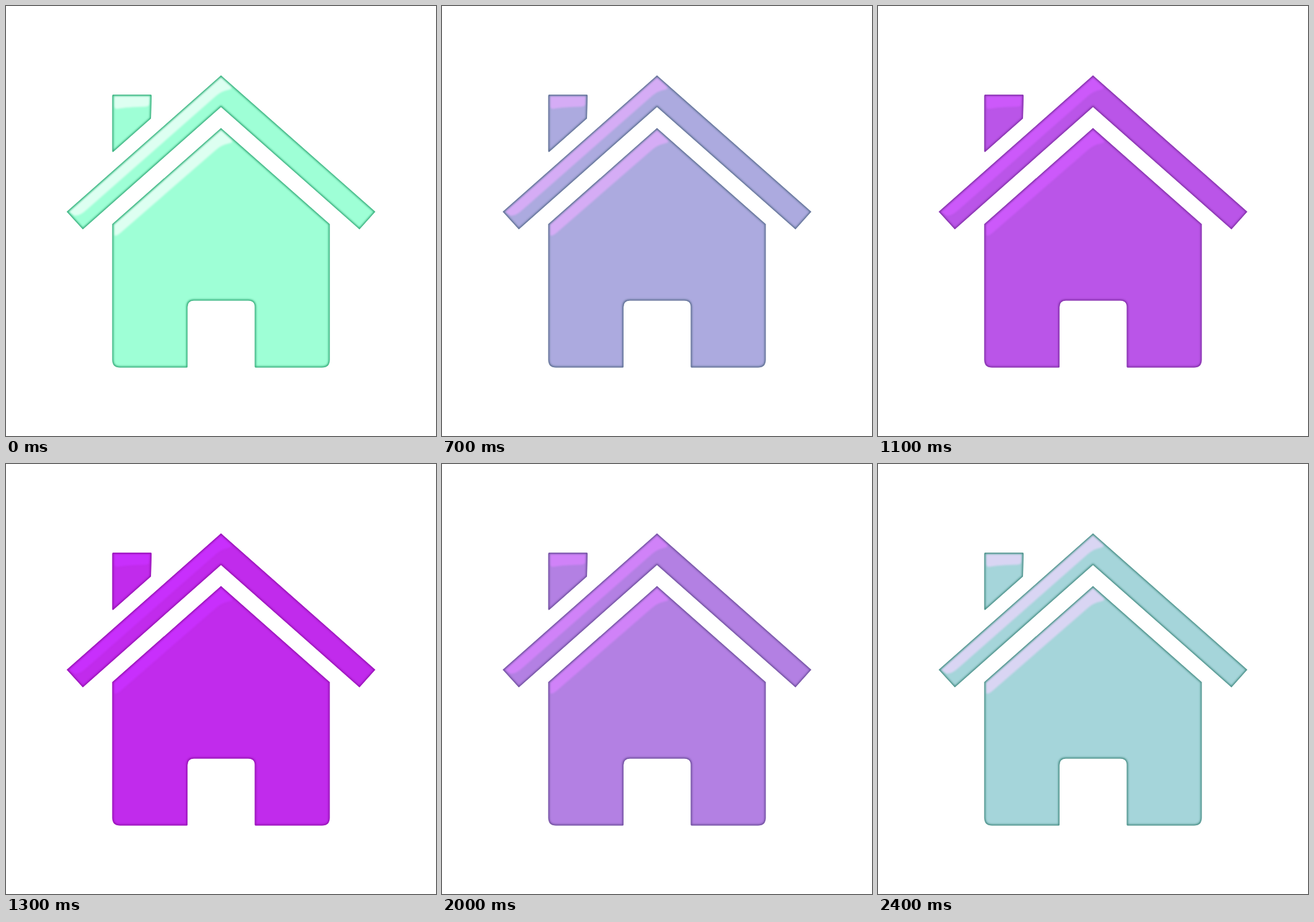
Animation, 694 px wide and 694 px high, one loop 2.6 s. Source, as an HTML page:

```html
<!DOCTYPE html>
<html lang="en">
<head>
<meta charset="utf-8">
<title>House</title>
<style>
html, body { margin: 0; width: 100%; height: 100%; overflow: hidden; background: #fff; }
svg { display: block; width: 100%; height: 100%; }
.base { fill: var(--base); }
.gloss { fill: var(--gloss); filter: blur(1.6px); }
.shade, .rim { fill: none; stroke: var(--edge); }
.shade { stroke-width: 4; filter: blur(1.8px); }
.rim { stroke-width: 2; opacity: .4; }
</style>
</head>
<body>
<svg viewBox="0 0 694 694">
  <defs>
    <path id="house" d="M173 143H233.500Q235 143 235 145L234 181.500L173 235.500Q171.500 236 171.500 234V145Q171.500 143 173 143Z
      M347 112L596 332L570.500 360.500L347 163L124 360.500L98 332Z
      M347 197L522.500 352V571Q522.500 583.500 510 583.500H403Q401.500 583.500 401.500 582V486Q401.500 475.500 391 475.500H303Q293 475.500 293 486V582Q293 583.500 291.500 583.500H184Q171.500 583.500 171.500 571V352Z"/>
    <clipPath id="cut"><use href="#house"/></clipPath>
  </defs>
  <g clip-path="url(#cut)">
    <use href="#house" class="base"/>
    <path class="gloss" d="M174 145H232V158Q231 162 225 162.500Q195 163 180 166Q174 166 174 161Z
      M347 113L364 129Q366 133 360 135Q348 137 338 146L130 329Q118 340 110 338L101 332Z
      M347 198L365 216Q367 221 359 222Q348 224 338 233L185 366Q178 372 174 370V352Z"/>
    <use href="#house" class="shade"/>
    <use href="#house" class="rim"/>
  </g>
</svg>
<script>
// Each tint runs from mint (step 0) to violet (step 5).
const tints = {
  base: [[158, 255, 214], [193, 43, 236]],
  gloss: [[221, 255, 241], [200, 47, 252]],
  edge: [[58, 176, 126], [152, 20, 182]]
};
const HOLD = 500, STEP = 200, LAST = 5, LOOP = 2600;
const root = document.documentElement.style;

function stepAt(t) {
  if (t < HOLD) return 0;
  const n = 1 + Math.floor((t - HOLD) / STEP);
  if (n < LAST) return n;
  if (t < 1800) return LAST;
  return LAST - 1 - Math.floor((t - 1800) / STEP);
}

function draw(now) {
  const k = stepAt(now % LOOP) / LAST;
  for (const [name, [from, to]] of Object.entries(tints)) {
    const rgb = from.map((v, i) => Math.round(v + (to[i] - v) * k));
    root.setProperty("--" + name, `rgb(${rgb})`);
  }
}

let start;
function tick(now) {
  start ??= now;
  draw(now - start);
  requestAnimationFrame(tick);
}
draw(0);
requestAnimationFrame(tick);
</script>
</body>
</html>
```
